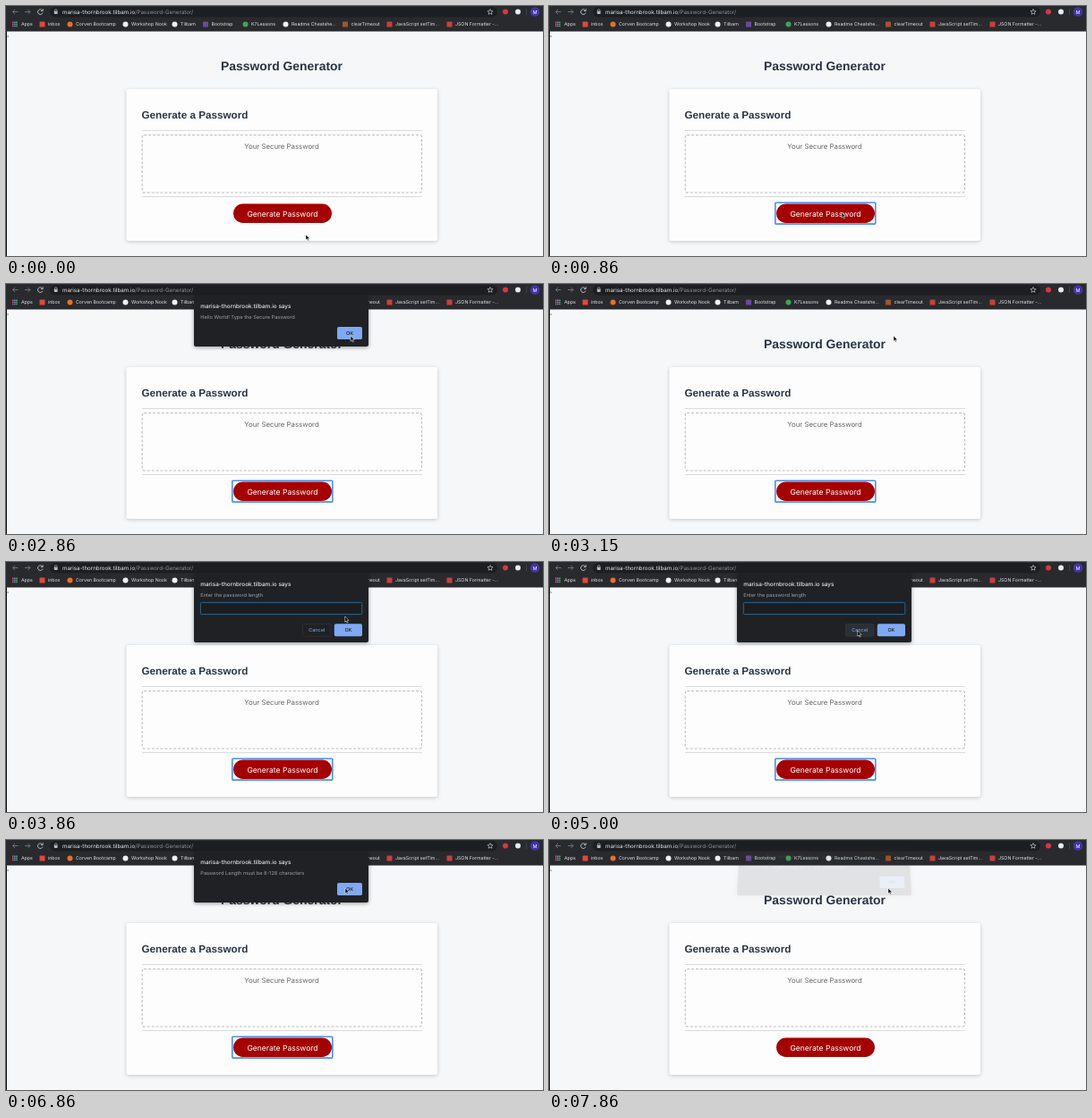
These frames come from a looping animation (600 by 280 pixels, 8 s). An HTML page:

```html
<!DOCTYPE html>
<html lang="en">
<head>
<meta charset="utf-8">
<title>Password Generator</title>
<style>
  html, body { margin: 0; width: 100%; height: 100%; overflow: hidden; background: #f5f7f9; }
  svg { position: absolute; left: 0; top: 0; overflow: visible; font-family: Inter, sans-serif; text-rendering: geometricPrecision; }
  .head { font-family: "Liberation Sans", Arial, sans-serif; font-weight: bold; fill: #2a3441; }
  .mid { text-anchor: middle; }
  #card { filter: drop-shadow(0 1px 2px #0003); }
  #dialog { left: 210px; top: 13px; transform-origin: 50% 100%; }
  #panel { filter: drop-shadow(0 1px 2px #0006); }
  #dialog text { font-size: 5.65px; fill: #9aa0a6; }
  #dialog .site { font-size: 6.4px; font-weight: 500; fill: #e8eaed; }
  #dialog .mid { font-size: 5.5px; font-weight: 500; }
</style>
</head>
<body>
<svg width="600" height="280">
  <rect width="600" height="280" fill="#f5f7f9"/>
  <path d="M.5 28V280" stroke="#111"/>
  <rect x="1.5" y="33.5" width="1.2" height="1" fill="#333"/>

  <!-- browser bars -->
  <rect width="600" height="28.5" fill="#292a2d"/>
  <rect x="49" y="1" width="500" height="11.5" rx="5.7" fill="#1d1e21"/>
  <g fill="none" stroke="#77797d" stroke-width=".9">
    <path d="M13.5 6.5H7.5M10 4L7.5 6.5L10 9M21 6.5H27M24.5 4L27 6.5L24.5 9"/>
    <path d="M40.6 5A2.8 2.8 0 1 0 41 7.5M41.2 3.3V5.5H39" stroke="#c5c7ca"/>
    <path d="M54.4 6V5a1.3 1.3 0 0 1 2.6 0V6" stroke="#b5b7ba" stroke-width=".7"/>
    <path d="M541 3.5l.9 2 2.2.2-1.7 1.4.5 2.2-1.9-1.2-1.9 1.2.5-2.2-1.7-1.4 2.2-.2z" stroke="#c5c7ca" stroke-width=".7"/>
    <path d="M581.5 3V10" stroke="#505256" stroke-width=".6"/>
  </g>
  <rect x="53.8" y="5.8" width="3.8" height="3.2" rx=".4" fill="#b5b7ba"/>
  <circle cx="558" cy="6.5" r="3" fill="#dc3545"/>
  <circle cx="572" cy="6.5" r="3" fill="#e8eaed"/>
  <circle cx="591" cy="6.5" r="5.3" fill="#4334a8"/>
  <text x="591" y="8.5" font-size="5.5" fill="#fff" class="mid">M</text>
  <text x="63" y="8.7" font-size="6.2" fill="#e8eaed">marisa-thornbrook.tilbam.io<tspan fill="#8f9296">/Password-Generator/</tspan></text>
  <g id="marks" font-size="5.25" fill="#e3e5e8"></g>

  <!-- page -->
  <text x="308" y="72" font-size="13.9" class="head mid">Password Generator</text>
  <rect id="card" x="134.5" y="93" width="347.5" height="170" rx="2.5" fill="#fdfdfd"/>
  <text x="151.5" y="126" font-size="11.7" class="head">Generate a Password</text>
  <path d="M152 139.5H465M152 213.5H465" stroke="#d6d8da" stroke-width=".9"/>
  <rect x="152.2" y="144.5" width="312.3" height="64.5" rx="2" fill="none" stroke="#bcbec0" stroke-width="1.1" stroke-dasharray="3 1.9"/>
  <text x="308" y="159.8" font-size="7.8" fill="#666" class="mid">Your Secure Password</text>
  <rect x="254" y="221.5" width="110" height="21.5" rx="10.75" fill="#a40202"/>
  <text x="309" y="235.5" font-size="8.57" fill="#fff" class="mid">Generate Password</text>
  <rect id="ring" x="252.8" y="220.3" width="112" height="23.8" rx=".8" fill="none" stroke="#4a8ff0" stroke-width="1.6"/>
</svg>

<svg id="dialog" width="195" height="57">
  <rect id="panel" width="195" height="57" rx="2" fill="#202124"/>
  <text x="7.3" y="13.8" class="site">marisa-thornbrook.tilbam.io says</text>
  <text id="message" x="7.3" y="26.4"></text>
  <g id="prompt">
    <rect x="7.4" y="32.4" width="180.4" height="13.2" rx="1.2" fill="#1c1d20" stroke="#2c6f9f" stroke-width=".9"/>
    <path id="caret" d="M10.3 35.5V42.5" stroke="#e8eaed" stroke-width=".6"/>
    <rect id="cancel" x="121.5" y="56.3" width="31.5" height="14" rx="1.8" stroke="#3a3d42" stroke-width=".5"/>
    <text x="137.3" y="65.3" class="mid" style="fill:#7398d0">Cancel</text>
  </g>
  <g id="ok">
    <rect id="okBox" y="35" height="14" rx="1.8" fill="#7fa9f3"/>
    <text id="okText" y="44" class="mid" style="fill:#202124">OK</text>
  </g>
</svg>

<svg width="600" height="280">
  <path id="cursor" d="M0 0V6.1L1.4 4.8L2.4 7.1L3.4 6.7L2.4 4.4H4.3Z" fill="#000" stroke="#fff" stroke-width=".5"/>
</svg>

<script>
const $ = id => document.getElementById(id);
const set = (el, attrs) => { for (const k in attrs) el.setAttribute(k, attrs[k]); };
const show = (el, on) => el.style.display = on ? "" : "none";

// Bookmarks: text x, label, icon colour, round icon
const marks = [
  [47, "inbox", "#e0483e", 0],
  [78, "Corven Bootcamp", "#e8702a", 1],
  [140, "Workshop Nook", "#f1f1f1", 1],
  [195, "Tilbam", "#f1f1f1", 1],
  [229.5, "Bootstrap", "#6a4a9c", 0],
  [274, "K7Lessons", "#3fa45b", 1],
  [319, "Readme Cheatshe...", "#f1f1f1", 1],
  [385.5, "clearTimeout", "#a5532e", 0],
  [435, "JavaScript setTim...", "#c8403c", 0],
  [502, "JSON Formatter -...", "#c8403c", 0]
];
let html = '<text x="17" y="22.4">Apps</text>';
for (let i = 0; i < 9; i++) {
  const color = ["#e0584c", "#5b9bea", "#59b070"][i % 3];
  html += `<rect x="${7 + i % 3 * 2.1}" y="${17.5 + Math.floor(i / 3) * 2.1}" width="1.5" height="1.5" fill="${color}"/>`;
}
for (const [x, label, color, round] of marks)
  html += `<rect x="${x - 9.5}" y="17.5" width="6" height="6" rx="${round ? 3 : .5}" fill="${color}"/><text x="${x}" y="22.4">${label}</text>`;
$("marks").innerHTML = html;

// Pointer stops: step, x, y
const path = [
  [0, 335, 256], [5, 327, 231], [9, 327, 231], [14, 386.7, 65.5], [17, 385, 58],
  [25, 385, 58], [33, 344.8, 77], [40, 344.8, 77], [46, 379, 54], [56, 379, 54]
];
// Dialogs: first step, full step, closing step, message, is prompt
const dialogs = [
  [7, 8, 21, "Hello World! Type the Secure Password", false],
  [23, 23, 36, "Enter the password length", true],
  [38, 39, 55, "Password Length must be 8-128 characters", false]
];

function pointer(step) {
  const i = path.findIndex(p => p[0] > step);
  const [t0, x0, y0] = path[i - 1], [t1, x1, y1] = path[i];
  const p = (step - t0) / (t1 - t0), e = p * p * (3 - 2 * p);
  return [x0 + (x1 - x0) * e, y0 + (y1 - y0) * e];
}

function drawDialog(step, x, y) {
  const now = dialogs.find(d => step >= d[0] && step <= d[2]);
  show($("dialog"), now);
  if (!now) return;
  const [, full, close, message, prompt] = now;
  const open = step === close ? .1 : step < full ? .5 : 1;
  const height = prompt ? 77 : 57;
  $("dialog").style.opacity = open;
  $("dialog").style.transform = open < 1
    ? `translateY(${-9 * (1 - open)}px) perspective(300px) rotateX(${11 * (1 - open)}deg)` : "none";
  set($("dialog"), { height });
  set($("panel"), { height });
  $("message").textContent = message;
  show($("prompt"), prompt);
  show($("caret"), Math.floor((step - 22.5) / 3.5) % 2 === 0);
  const overCancel = x > 331 && x < 363 && y > 69 && y < 84;
  set($("cancel"), { fill: overCancel ? "#2a2f38" : "#202124" });
  set($("ok"), { transform: `translate(0 ${prompt ? 21.3 : 0})` });
  set($("okBox"), { x: prompt ? 156.8 : 160, width: prompt ? 31.2 : 28 });
  set($("okText"), { x: prompt ? 172.4 : 174 });
}

function frame(ms) {
  const step = Math.floor(ms % 8000 * 7 / 1000); // seven steps a second
  const [x, y] = pointer(step);
  set($("cursor"), { transform: `translate(${x} ${y})` });
  show($("ring"), step >= 6 && step < 55);
  drawDialog(step, x, y);
  requestAnimationFrame(frame);
}
frame(0);
</script>
</body>
</html>
```
